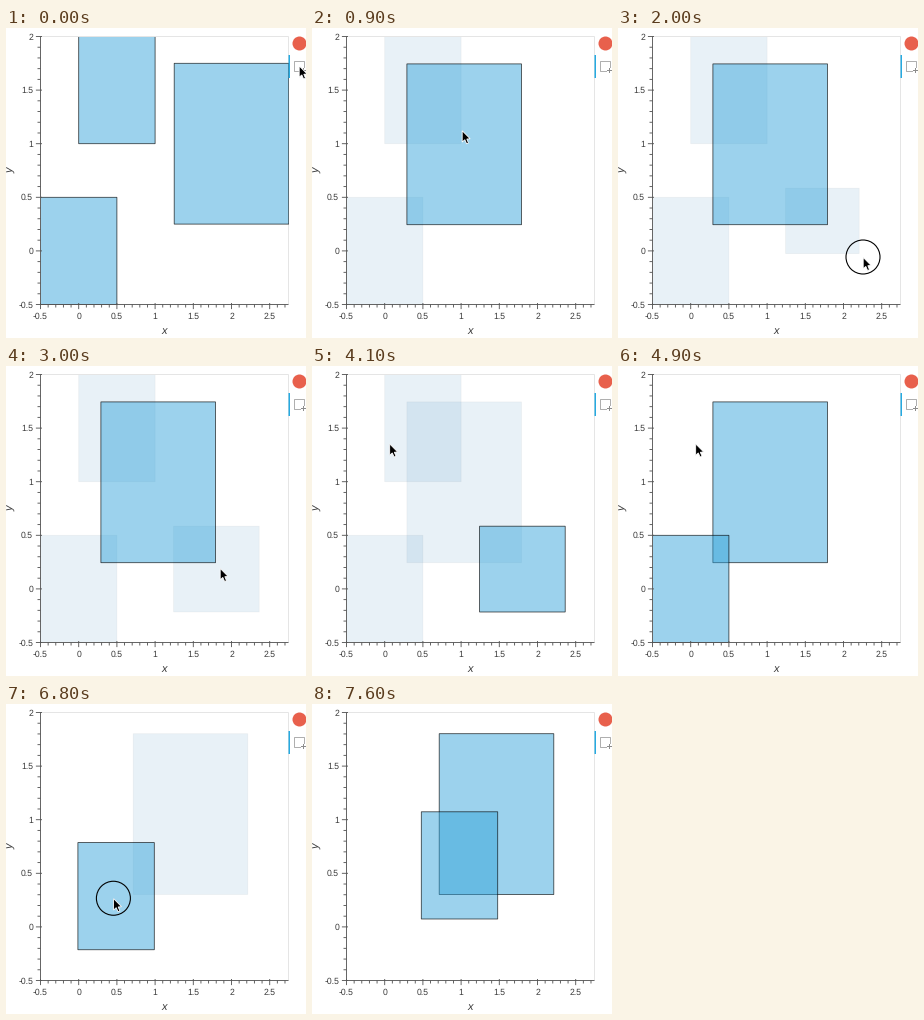
Animation, 300 px wide and 310 px high, one loop 7900 ms. Source, as a matplotlib script:

```python
import numpy as np
import matplotlib.pyplot as plt
from matplotlib.animation import FuncAnimation
from matplotlib.patches import Circle, Polygon, Rectangle

W, H, DPI = 300, 310, 100
FRAMES, INTERVAL = 79, 100
LEFT, RIGHT, TOP, BOTTOM = 34.5, 282.5, 8.5, 276.5
PX = 0.72  # points per pixel
AXIS, INK = "#555555", "#3a3a3a"

plt.rcParams["text.hinting"] = "none"
plt.rcParams["font.family"] = "Liberation Sans"

fig = plt.figure(figsize=(W / DPI, H / DPI), dpi=DPI, facecolor="white")
ax = fig.add_axes([0, 0, 1, 1])
ax.set_xlim(0, W)
ax.set_ylim(H, 0)
ax.axis("off")


def to_x(v):
    return LEFT + (v + 0.5) * 76.4


def to_y(v):
    return BOTTOM - (v + 0.5) * 107.2


def line(x0, y0, x1, y1, color=AXIS, width=0.9, z=5):
    ax.plot([x0, x1], [y0, y1], color=color, lw=width * PX, zorder=z,
            solid_capstyle="butt", snap=False)


def label(x, y, text, size=8.7, va="baseline", **kw):
    ax.text(x, y, text, fontsize=size * PX, color=INK, va=va, **kw)


def draw_axes():
    line(LEFT, TOP, RIGHT, TOP, "#e5e5e5", 1, 1)
    line(RIGHT, TOP, RIGHT, BOTTOM, "#e5e5e5", 1, 1)
    line(LEFT, BOTTOM, RIGHT, BOTTOM)
    line(LEFT, TOP, LEFT, BOTTOM)
    for i in range(-5, 28):
        x, major = to_x(i / 10), i % 5 == 0
        line(x, BOTTOM - 1.5 * major, x, BOTTOM + (4.6 if major else 3))
        if major:
            label(x, 291.4, f"{i / 10:g}", ha="center")
    for i in range(-5, 21):
        y, major = to_y(i / 10), i % 5 == 0
        line(LEFT - (4.6 if major else 3), y, LEFT + 1.5 * major, y)
        if major:
            label(27, y + 3.1, f"{i / 10:g}", ha="right")
    label(158.5, 306, "x", 11, style="italic", ha="center")
    label(5, 142.5, "y", 11, va="center", style="italic", ha="center",
          rotation=90)


def draw_toolbar():
    ax.add_patch(Circle((293.5, 15.5), 7, fc="#e8604c", ec="none"))
    ax.add_patch(Rectangle((282.5, 27), 1.5, 23, fc="#26aae1", ec="none",
                           zorder=6, snap=False))
    ax.add_patch(Rectangle((288.5, 33.5), 10, 10, fc="white", ec="#a6a6a6",
                           lw=0.9 * PX, snap=False))
    ax.add_patch(Rectangle((295, 39.5), 5, 6, fc="white", ec="none", zorder=2))
    line(295, 42.5, 300, 42.5, "#8c8c8c", 1)
    line(297.5, 40, 297.5, 45, "#8c8c8c", 1)


draw_axes()
draw_toolbar()

plot_area = Rectangle((LEFT, TOP), RIGHT - LEFT, BOTTOM - TOP,
                      transform=ax.transData)


def make_box(x0, y0, x1, y1):
    """Box given in data coordinates, clipped to the plot."""
    left, top = to_x(x0), to_y(y1)
    box = Rectangle((left, top), to_x(x1) - left, to_y(y0) - top,
                    lw=0.8 * PX, snap=False)
    ax.add_patch(box)
    box.set_clip_path(plot_area)
    return box


boxes = {
    "top": make_box(0, 1, 1, 2),
    "tall": make_box(1.25, 0.25, 2.75, 1.75),
    "low": make_box(-0.5, -0.5, 0.5, 0.5),
    "new": make_box(1.242, 0.5, 1.25, 0.585),
}
home = {name: np.array(box.get_xy()) for name, box in boxes.items()}

ring = Circle((0, 0), 17, fc="none", ec="black", lw=1.1 * PX, zorder=20)
ax.add_patch(ring)

ARROW = np.array([(0, 0), (0, 11.4), (2.6, 9), (4.4, 13.1), (6.3, 12.3),
                  (4.6, 8.3), (8, 8.1)]) + (0.2, 0.4)
arrow = Polygon(ARROW, closed=True, fc="black", ec="white", lw=0.8 * PX,
                zorder=21)
ax.add_patch(arrow)

# Pointer moves: first step, last step, destination, what it holds
ORIGIN = (293, 37.5)
MOVES = [
    (0, 4, (223.3, 101.7), None),
    (4, 8, (150, 102.3), "tall"),
    (9, 14, tuple(home["new"]), None),
    (15, 20, (245, 229), "new"),
    (20, 24, (253.2, 246), "new"),
    (26, 30, (214, 202), None),
    (34, 41, (77.5, 77.5), None),
    (53, 57, (144.2, 133.2), None),
    (57, 61, (176.5, 127), "tall"),
    (62, 66, (70, 225), None),
    (66, 70, (144.8, 163.5), "low"),
    (72, 76, (158, 330), None),
]
# The selection from each step on
SELECTIONS = [(0, ""), (4, "tall"), (32, "new"), (42, "top new"), (49, ""),
              (58, "tall"), (61, ""), (66, "low"), (72, "")]
DRAW_START, DRAW_END, DELETE = 15, 24, 49
DRAW_LAG = 0.4


def ease(u):
    """Halfway between linear and smoothstep."""
    u = np.clip(u, 0, 1)
    return 0.5 * (u + u * u * (3 - 2 * u))


def pointer(step):
    pos = np.array(ORIGIN)
    for start, end, goal, _ in MOVES:
        pos = pos + (np.array(goal) - pos) * ease((step - start) / (end - start))
    return pos


def drag_offset(name, step):
    total = np.zeros(2)
    for start, end, _, held in MOVES:
        if held == name:
            total += pointer(np.clip(step, start, end)) - pointer(start)
    return total


def style(box, look):
    fill, alpha, edge, z = {
        "normal": ("#30a2da", 0.48, 0.75, 2),
        "muted": ("#1f77b4", 0.1, 0.04, 2),
        "selected": ("#30a2da", 0.48, 0.75, 3),
    }[look]
    box.set_facecolor((fill, alpha))
    box.set_edgecolor(("black", edge))
    box.set_zorder(z)


def update(step):
    selected = [names for start, names in SELECTIONS if start <= step][-1].split()
    for name, box in boxes.items():
        if name != "new":
            box.set_xy(home[name] + drag_offset(name, step))
        if not selected:
            style(box, "normal")
        else:
            style(box, "selected" if name in selected else "muted")

    boxes["top"].set_visible(step < DELETE)
    boxes["new"].set_visible(DRAW_START < step < DELETE)
    corner = pointer(np.clip(step - DRAW_LAG, DRAW_START, DRAW_END))
    width, height = corner - home["new"]
    boxes["new"].set_width(width)
    boxes["new"].set_height(height)

    tip = pointer(step)
    arrow.set_xy(ARROW + tip)
    ring.center = tuple(tip)
    ring.set_visible(any(held and start <= step < end
                         for start, end, _, held in MOVES))
    return [*boxes.values(), ring, arrow]


anim = FuncAnimation(fig, update, frames=FRAMES, interval=INTERVAL,
                     repeat=True, repeat_delay=0, blit=False)
plt.show()
```
